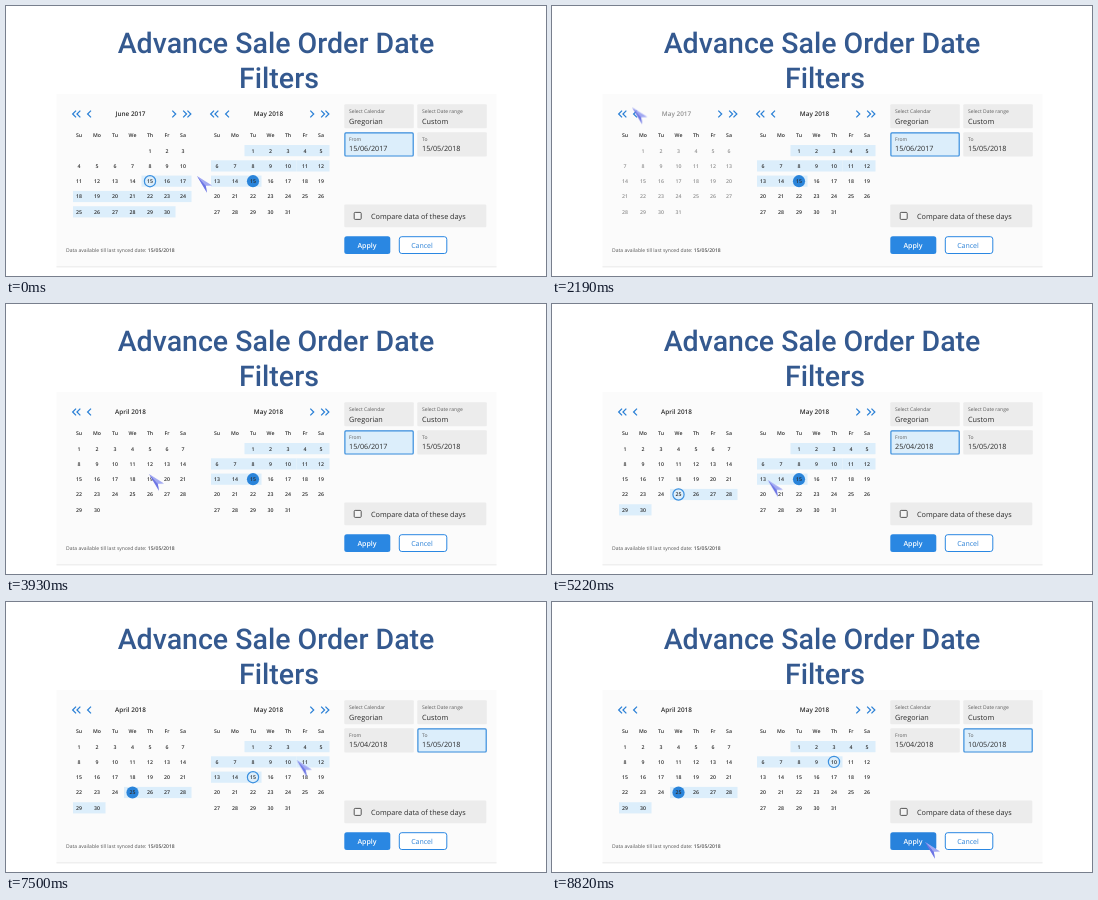
Recreate the animation shown at these times as an HTML page. Size 540x270 px, loop 9900 ms.

```html
<!DOCTYPE html>
<html lang="en">
<head>
<meta charset="utf-8">
<title>Date filters</title>
<style>
  html, body { margin: 0; width: 100%; height: 100%; overflow: hidden; background: #fff; }
  svg { display: block; width: 540px; height: 270px; }
  text { font-family: "Open Sans", sans-serif; fill: #2b2b2b; text-rendering: geometricPrecision; }
  .mid { text-anchor: middle; }
  .title { font: 500 28.5px Roboto, sans-serif; fill: #34598f; }
  .month { font-size: 6.4px; font-weight: 600; }
  .day { font-size: 5.2px; font-weight: 600; }
  .label { font-size: 5px; fill: #5c5c5c; }
  .value { font-size: 7.25px; font-weight: 500; }
  .note { font-size: 5.05px; fill: #555; }
  .button { font-size: 7px; font-weight: 600; }
  .field { fill: #ececec; }
  .band, .focus, .ring { fill: #dceefb; }
  .focus, .ring { stroke: #3a8fdf; stroke-width: 1.2; }
  .dot { fill: #2a84da; }
  .arrow { fill: none; stroke: #2b80d6; stroke-width: 1.25; }
</style>
</head>
<body>
<svg id="stage" viewBox="0 0 540 270"></svg>
<script>
const LOOP = 9900;
const stage = document.getElementById('stage');
const sheet = document.head.appendChild(document.createElement('style'));
let tracks = 0;

function add(parent, tag, attrs = {}, content) {
  const el = document.createElementNS('http://www.w3.org/2000/svg', tag);
  for (const key in attrs) el.setAttribute(key, attrs[key]);
  if (content !== undefined) el.textContent = content;
  return parent.appendChild(el);
}
const group = (parent = stage) => add(parent, 'g');
const text = (parent, x, y, cls, content) => add(parent, 'text', { x, y, class: cls }, content);
const rect = (parent, x, y, width, height, attrs) =>
  add(parent, 'rect', { x, y, width, height, ...attrs });

// Loops an element through [ms, css] stops, holding the first and last.
function track(el, stops) {
  const name = 'k' + tracks++;
  const all = [[0, stops[0][1]], ...stops, [LOOP, stops[stops.length - 1][1]]];
  const body = all.map(([ms, css]) => `${(ms / LOOP * 100).toFixed(4)}% { ${css} }`).join(' ');
  sheet.textContent += `@keyframes ${name} { ${body} }\n`;
  el.style.animation = `${name} ${LOOP}ms linear infinite`;
  return el;
}

// Each change is [start, end, opacity at end].
function fade(el, from, ...changes) {
  let value = from;
  const stops = [];
  for (const [start, end, to] of changes) {
    stops.push([start, `opacity: ${value}`], [end, `opacity: ${to}`]);
    value = to;
  }
  return track(el, stops);
}

const COLS = [73, 91, 109, 126.5, 144, 161, 177];
const RIGHT = 138;
const rowY = row => 144.6 + 15.3 * row;

function cell(dx, first, day) {
  const n = first + day - 1, col = n % 7;
  return { col, x: COLS[col] + dx, y: rowY(Math.floor(n / 7)) };
}

function bands(parent, dx, first, from, to) {
  for (let day = from; day <= to;) {
    const a = cell(dx, first, day);
    const last = Math.min(to, day + 6 - a.col);
    const b = cell(dx, first, last);
    const left = a.x - (a.col ? 8.5 : 6);
    rect(parent, left, a.y - 5.6, b.x + 8.5 - left, 11.2, { class: 'band' });
    day = last + 1;
  }
}

function mark(parent, dx, first, day, cls) {
  const { x, y } = cell(dx, first, day);
  return add(parent, 'circle', { cx: x, cy: y, r: cls === 'dot' ? 6.1 : 5.6, class: cls });
}

function month(parent, dx, name, first, days) {
  text(parent, 124.5 + dx, 110.3, 'month mid', name);
  for (let day = 1; day <= days; day++) {
    const { x, y } = cell(dx, first, day);
    text(parent, x, y + 1.9, 'day mid', day);
  }
}

function chevrons(parent, x, dir, count) {
  for (let i = 0; i < count; i++) {
    const cx = x + (i - (count - 1) / 2) * 4.3;
    add(parent, 'path', { d: `M${cx + dir * -1.7} 104.6 l${dir * 3.4} 3.4 l${dir * -3.4} 3.4`, class: 'arrow' });
  }
}

function weekdays(dx) {
  ['Su', 'Mo', 'Tu', 'We', 'Th', 'Fr', 'Sa'].forEach((d, i) =>
    text(stage, COLS[i] + dx, 131, 'day mid', d));
}

function arrows(parent, dx, dir) {
  chevrons(parent, (dir < 0 ? 70.5 : 181) + dx, dir, 2);
  chevrons(parent, (dir < 0 ? 83.3 : 168) + dx, dir, 1);
}

// Heading and panel
text(stage, 270, 47, 'title mid', 'Advance Sale Order Date');
text(stage, 273, 82, 'title mid', 'Filters');
rect(stage, 50.5, 88, 440, 173, { fill: '#fbfbfb' });
rect(stage, 50.5, 260.5, 440, 0.8, { fill: '#e4e4e4' });

// Moments of the clicks
const PICK_FROM = [4530, 4710], SWITCH = [6330, 6510], PICK_TO = [7690, 7870];

// Left calendar
const june = group();
bands(june, 0, 4, 15, 30);
mark(june, 0, 4, 15, 'ring');
month(june, 0, 'June 2017', 4, 30);
fade(june, 1, [1350, 1530, 0]);

const may17 = group();
month(may17, 0, 'May 2017', 1, 31);
fade(may17, 0, [1530, 1710, 1], [2100, 2290, 0]);

const april17 = group();
month(april17, 0, 'April 2017', 6, 30);
fade(april17, 0, [2290, 2460, 1], [3510, 3660, 0]);

const picked = group();
bands(picked, 0, 0, 25, 30);
fade(picked, 0, [...PICK_FROM, 1]);
fade(mark(stage, 0, 0, 25, 'ring'), 0, [...PICK_FROM, 1], [...SWITCH, 0]);
fade(mark(stage, 0, 0, 25, 'dot'), 0, [...SWITCH, 1]);
const april18 = group();
month(april18, 0, 'April 2018', 0, 30);
fade(april18, 0, [3660, 3810, 1]);

weekdays(0);
arrows(stage, 0, -1);
const leftNext = group();
arrows(leftNext, 0, 1);
fade(leftNext, 1, [3510, 3810, 0]);

// Right calendar
bands(stage, RIGHT, 2, 1, 10);
const tail = group();
bands(tail, RIGHT, 2, 11, 15);
fade(tail, 1, [...PICK_TO, 0]);
fade(mark(stage, RIGHT, 2, 15, 'dot'), 1, [...SWITCH, 0]);
fade(mark(stage, RIGHT, 2, 15, 'ring'), 0, [...SWITCH, 1], [...PICK_TO, 0]);
fade(mark(stage, RIGHT, 2, 10, 'ring'), 0, [...PICK_TO, 1]);
month(stage, RIGHT, 'May 2018', 2, 31);
weekdays(RIGHT);
arrows(stage, RIGHT, 1);
const rightPrev = group();
arrows(rightPrev, RIGHT, -1);
fade(rightPrev, 1, [3510, 3810, 0]);

// Fields
function field(x, y, height, label) {
  rect(stage, x, y, 69.5, height, { class: 'field', rx: 1 });
  const focus = rect(stage, x + 0.6, y + 0.6, 68.3, height - 1.2, { class: 'focus', rx: 1, opacity: 0 });
  text(stage, x + 4.7, y + 8.2, 'label', label);
  return focus;
}
const value = (x, y, content) => text(stage, x, y, 'value', content);

field(338.3, 98.3, 24, 'Select Calendar');
field(411.3, 98.3, 24, 'Select Date range');
value(343, 117.6, 'Gregorian');
value(416, 117.6, 'Custom');
fade(field(338.3, 126.3, 24.3, 'From'), 1, [...SWITCH, 0]);
fade(field(411.3, 126.3, 24.3, 'To'), 0, [...SWITCH, 1]);
fade(value(343, 145.2, '15/06/2017'), 1, [...PICK_FROM, 0]);
fade(value(343, 145.2, '25/04/2018'), 0, [...PICK_FROM, 1], [...SWITCH, 0]);
fade(value(343, 145.2, '15/04/2018'), 0, [...SWITCH, 1]);
fade(value(416, 145.2, '15/05/2018'), 1, [...PICK_TO, 0]);
fade(value(416, 145.2, '10/05/2018'), 0, [...PICK_TO, 1]);

rect(stage, 338.3, 198.6, 142, 22.6, { class: 'field', rx: 1 });
rect(stage, 348.2, 206.4, 7, 7, { fill: '#f4f4f4', stroke: '#444', 'stroke-width': 0.9, rx: 1 });
value(365, 212.6, 'Compare data of these days');

// Footer
const note = text(stage, 60, 246, 'note', 'Data available till last synced date: ');
add(note, 'tspan', { 'font-weight': 600 }, '15/05/2018');
const apply = rect(stage, 338.3, 230.2, 46, 17.8, { rx: 2.5 });
track(apply, [[8640, 'fill: #2a87e2'], [8820, 'fill: #2882dc']]);
text(stage, 361, 241.8, 'button mid', 'Apply').style.fill = '#fff';
rect(stage, 393.3, 230.7, 47.5, 16.8, { rx: 2.5, fill: '#fff', stroke: '#2a87e2', 'stroke-width': 1 });
const cancel = text(stage, 416, 241.8, 'button mid', 'Cancel');
cancel.style.cssText = 'fill: #2a80d6; font-weight: 500';

// Pointer, drawn with its tip at the origin
const pointer = group();
add(pointer, 'path', { d: 'M0 0 L15 9.5 L8.8 9.8 Z', fill: '#c2c7f8' });
add(pointer, 'path', { d: 'M0 0 L8.8 9.8 L10 16.8 Z', fill: '#6068df' });
add(pointer, 'path', { d: 'M0 0 L15 9.5 L8.8 9.8 L10 16.8 Z', fill: '#7a82ea', opacity: 0.45 });

const at = (ms, x, y, ease = 'ease-in-out') =>
  [ms, `transform: translate(${x}px, ${y}px); animation-timing-function: ${ease}`];
track(pointer, [
  at(450, 191, 170), at(690, 211, 191), at(1440, 80, 101),
  at(2100, 80, 101), at(2490, 82, 105), at(3490, 175, 107, 'ease-in'),
  at(3930, 143, 170, 'ease-out'), at(4500, 125, 190),
  at(4860, 125, 190), at(5850, 453, 140), at(6000, 454, 140),
  at(6660, 454, 140), at(7650, 283, 159),
  at(7860, 283, 159), at(8820, 373, 240)
]);
</script>
</body>
</html>
```
